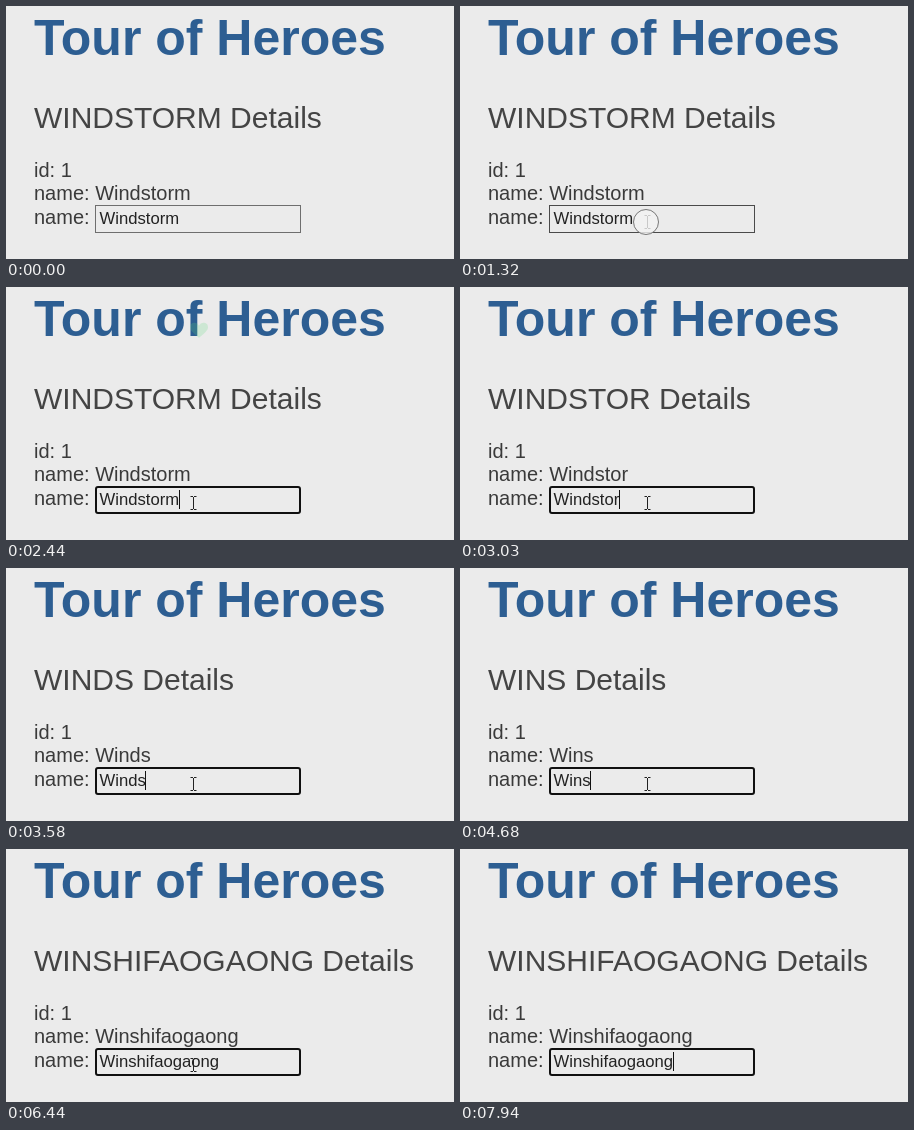
An HTML page for the animation above (8400 ms loop, 448x253 px).

```html
<!DOCTYPE html>
<html lang="en">
<head>
<meta charset="utf-8">
<title>Tour of Heroes</title>
<style>
  html, body { margin: 0; width: 100%; height: 100%; overflow: hidden; background: #ebebeb; }
  svg { display: block; width: 448px; height: 253px; }
  text { font: 20px "Liberation Sans", Arial, sans-serif; fill: #3a3a3a; white-space: pre; }
  .title { font-size: 50px; font-weight: bold; fill: #2d5e92; }
  .heading { font-size: 30px; fill: #444; }
  #value { font-size: 16.667px; fill: #222; }
  #field { fill: none; stroke: #6e6e6e; }
  #field.hover { stroke: #4a4a4a; }
  #field.focus { stroke: #101010; stroke-width: 2; }
  #beam { fill: none; stroke: #222; }
  #arrow { fill: #fff; stroke: #111; }
  #click { fill: #f2f2f2; fill-opacity: .8; stroke: #777; }
  #heart { fill: #5fd87e; }
</style>
</head>
<body>
<svg viewBox="0 0 448 253">
  <text class="title" x="28" y="49">Tour of Heroes</text>
  <text class="heading" id="heading" x="28" y="122"></text>
  <text x="28" y="171">id: 1</text>
  <text id="name" x="28" y="194"></text>
  <text x="28" y="218">name:</text>
  <rect id="field"/>
  <text id="value" x="93.6" y="218"></text>
  <rect id="caret" y="203" width="1" height="19" fill="#111"/>
  <path id="heart" d="M9 15C3 10 0 7.500 0 4.500C0 1 2.500 0 4.500 0C6.500 0 8 1 9 3C10 1 11.500 0 13.500 0C15.500 0 18 1 18 4.500C18 7.500 15 10 9 15Z"/>
  <path id="beam" d="M-3-6.500h2.500M.5-6.500h2.500M0-6V6M-3 6.500h2.500M.5 6.500h2.500"/>
  <path id="arrow" d="M.5.500V16l3.500-3.300 2.500 5.800 2.300-1-2.500-5.600h5z"/>
  <circle id="click" cx="186" cy="216" r="12.500"/>
</svg>
<script>
const LOOP = 8400;
const ENTER = 300, REST = 680, PRESS = 1320, FOCUS = 1400, LEAVE = 6750, GONE = 6830;

// [time, value] pairs; each value holds until the next time
const names = [
  [0, "Windstorm"], [3030, "Windstor"], [3180, "Windsto"], [3420, "Windst"],
  [3560, "Winds"], [3810, "Wind"], [4050, "Win"], [4680, "Wins"], [4770, "Winsh"],
  [4910, "Winshi"], [5090, "Winshifa"], [5140, "Winshifao"], [5390, "Winshifaog"],
  [5630, "Winshifaogao"], [5880, "Winshifaogaong"]
];
const blinks = [
  [0, false], [FOCUS, true], [1900, false], [2370, true], [2960, false], [3030, true],
  [4510, false], [4680, true], [6440, false], [6920, true], [7460, false], [7940, true]
];

const el = id => document.getElementById(id);
const show = (id, on) => el(id).setAttribute("visibility", on ? "visible" : "hidden");
const move = (id, x, y) => el(id).setAttribute("transform", `translate(${x} ${y})`);
const at = (list, t) => list.findLast(([start]) => start <= t)[1];
const within = (t, from, to) => t >= from && t < to;

function drawText(t) {
  const name = at(names, t);
  el("heading").textContent = name.toUpperCase() + " Details";
  el("name").textContent = "name: " + name;
  el("value").textContent = name;
  el("caret").setAttribute("x", Math.floor(93.6 + el("value").getComputedTextLength()));
  show("caret", at(blinks, t));
}

function drawPointer(t) {
  const p = Math.min(1, Math.max(0, (t - ENTER) / (REST - ENTER)));
  const ease = 1 - (1 - p) ** 2;
  const leaving = t >= LEAVE;
  const x = leaving ? 177 : 181 + 6.5 * ease;
  const y = leaving ? 231 : 246 - 30 * ease;
  const inside = !leaving && y < 227;
  const visible = within(t, ENTER, GONE);
  move("beam", x, y);
  move("arrow", x, y);
  show("beam", visible && inside);
  show("arrow", visible && !inside);
  show("click", within(t, PRESS, FOCUS));
  return visible && inside;
}

function drawField(t, hover) {
  const focus = t >= FOCUS, inset = focus ? 1 : 0.5;
  const box = { x: 89 + inset, y: 199 + inset, width: 206 - 2 * inset, height: 28 - 2 * inset, rx: focus ? 2 : 0 };
  for (const key in box) el("field").setAttribute(key, box[key]);
  el("field").setAttribute("class", focus ? "focus" : hover ? "hover" : "");
}

// The heart floats 200px up and fades over 1.5s
function drawHeart(t) {
  const swing = 0.5 - Math.cos(Math.PI * (t - FOCUS) / 1500) / 2;
  move("heart", 184, 193 - 200 * swing);
  el("heart").setAttribute("opacity", 1 - swing);
  show("heart", within(t, FOCUS, 2680));
}

const start = performance.now();
function frame() {
  const t = (performance.now() - start) % LOOP;
  drawText(t);
  drawField(t, drawPointer(t));
  drawHeart(t);
  requestAnimationFrame(frame);
}
frame();
</script>
</body>
</html>
```
